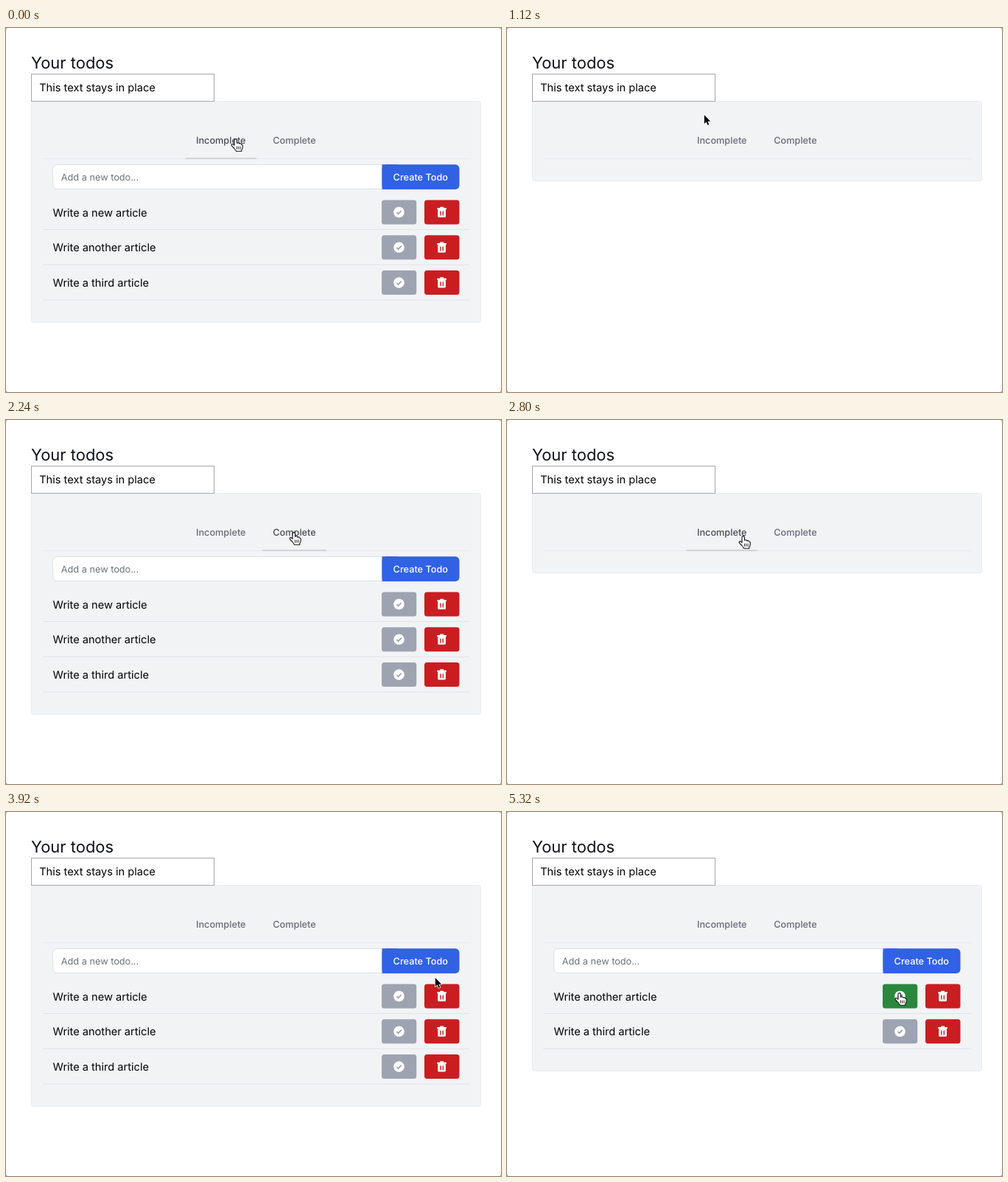
An HTML page for the animation above (5460 ms loop, 672 by 494 pixels).

```html
<!DOCTYPE html>
<html lang="en">
<head>
<meta charset="utf-8">
<title>Your todos</title>
<style>
  html, body { margin: 0; width: 100%; height: 100%; overflow: hidden; background: #fff; }
  svg { display: block; width: 100%; height: 100%; }
  text { font-family: Inter, "Liberation Sans", sans-serif; font-size: 14.6px; font-optical-sizing: none; fill: #000; text-rendering: geometricPrecision; }
  .title { font-size: 21.95px; fill: #10121a; }
  .small { font-size: 12.72px; }
  .mid { font-weight: 550; text-anchor: middle; }
</style>
</head>
<body>
<svg id="stage" viewBox="0 0 672 494" xmlns="http://www.w3.org/2000/svg"></svg>
<script>
const LOOP = 5460, STEP = 70, ROW = 47.8;
const GREY = "#9ea3b1", GREEN = "#2b873d", RED = "#c81e22";
const TODOS = ["Write a new article", "Write another article", "Write a third article"];

// Places the pointer visits
const spot = (x, y) => ({ x, y });
const START = spot(311, 150), INCOMPLETE = spot(300, 159), COMPLETE = spot(390, 152);
const EDGE = spot(320, 157), REST = spot(316, 157), ABOVE = spot(267, 117), NOTE = spot(75, 54);
const GAP = spot(582, 224), LIST = spot(348, 235), BESIDE = spot(506, 235), CHECK = spot(532, 245);

// Each move: start, end, destination
const MOVES = [
  [0, 490, COMPLETE], [630, 1120, ABOVE], [1190, 1330, NOTE], [1330, 1610, INCOMPLETE],
  [1750, 1960, GAP], [1960, 2240, COMPLETE], [2520, 2660, NOTE], [2660, 2800, EDGE],
  [2940, 3220, REST], [3710, 3920, GAP], [3920, 4060, LIST], [4270, 4410, GAP],
  [4410, 4550, BESIDE], [4690, 5250, CHECK]
];

const stage = document.getElementById("stage");

function add(parent, tag, attrs, content) {
  const el = document.createElementNS("http://www.w3.org/2000/svg", tag);
  for (const key in attrs) el.setAttribute(key, attrs[key]);
  if (content) el.textContent = content;
  parent.appendChild(el);
  return el;
}

function box(parent, x, y, width, height, rx, fill, stroke = "none") {
  return add(parent, "rect", { x, y, width, height, rx, fill, stroke });
}

function label(parent, x, y, content, cls = "", fill = "") {
  return add(parent, "text", { x, y, class: cls, style: fill && "fill:" + fill }, content);
}

function line(parent, x1, x2, y, stroke, width = 1) {
  return add(parent, "line", { x1, x2, y1: y, y2: y, stroke, "stroke-width": width });
}

function show(el, on) {
  el.style.display = on ? "" : "none";
}

// Page and panel
box(stage, 0, 0, 672, 494, 0, "#777");
box(stage, 0, 0, 672, 494, 2.5, "#fff");
const panel = box(stage, 34.5, 99.5, 610, 300, 3, "#f2f3f5", "#e9eaed");
box(stage, 34.5, 62.5, 248, 37, 0, "#fff", "#a5a6aa");
label(stage, 34, 55.4, "Your todos", "title");
label(stage, 45.2, 86, "This text stays in place");

// Tabs
line(stage, 49, 630.5, 177.5, "#e9eaed");
function makeTab(name, x, w) {
  return {
    x, w,
    text: label(stage, x + w / 2, 157.1, name, "small mid"),
    mark: line(stage, x, x + w, 177, "#c9cad0", 1.5)
  };
}
const tabs = [makeTab("Incomplete", 243.5, 96.5), makeTab("Complete", 348, 87)];

// Form
const list = add(stage, "g", {});
box(list, 63.5, 185.5, 470, 33, 5.5, "#fff", "#dfe1e6");
box(list, 510.5, 185.3, 105, 33.6, 5.5, "#3161e4");
box(list, 510.5, 185.3, 20, 33.6, 0, "#3161e4");
label(list, 74.8, 207, "Add a new todo...", "small", "#6d717b");
label(list, 562.8, 207, "Create Todo", "small mid", "#fff");

// Todo rows
const rows = TODOS.map((todo, i) => {
  const g = add(list, "g", { transform: `translate(0 ${i * ROW})` });
  const name = label(g, 63.5, 255.6, todo);
  const done = box(g, 510, 233.5, 47.2, 33, 3.5, GREY);
  add(g, "circle", { cx: 533.5, cy: 250, r: 7.3, fill: "#fff" });
  const tick = add(g, "path", { d: "M530.4 250.2l2.2 2.2 4.1-4.4", fill: "none", "stroke-width": 1.7 });
  box(g, 568, 233.5, 47.5, 33, 3.5, RED);
  box(g, 589, 242.7, 5.2, 3, 1, "#fff");
  box(g, 585.2, 244.2, 12.8, 2, 0.5, "#fff");
  box(g, 586.2, 245.5, 10.8, 11.5, 1.6, "#fff");
  for (const x of [589.2, 592.6]) box(g, x, 248.6, 1.4, 6, 0.5, RED);
  line(g, 49, 630.5, 273.5, "#e1e3e7");
  return { g, name, done, tick };
});

// Pointers
const arrow = add(stage, "path", {
  d: "M.8 1V13L3.6 10.6L5.4 14.8L7.3 14L5.5 9.8H9.2Z",
  stroke: "#fff", "stroke-width": 1.6, "stroke-linejoin": "round", "paint-order": "stroke"
});
const hand = add(stage, "g", { stroke: "#111", "stroke-linejoin": "round" });
add(hand, "path", {
  d: "M-1 2.4Q-1 .6 .7 .6T2.5 2.4V6.3Q5 5 5.7 7Q8 6 8.3 8Q10.3 7.6 10.2 10V12Q10 14 8.8 15.5V17.3H1.5Q.6 15.4-1 13.5L-4.6 9.8Q-5.4 8-4 7.6T-1 9.4Z",
  fill: "#fff", "stroke-width": 1.1
});
for (const x of [2.5, 4.8, 7.1]) add(hand, "path", { d: `M${x} 10.6v4`, "stroke-width": 0.9 });

const ease = k => k * k * (3 - 2 * k);

function pointerAt(t) {
  let { x, y } = START;
  for (const [from, to, goal] of MOVES) {
    const k = ease(Math.min(1, Math.max(0, (t - from) / (to - from))));
    x += (goal.x - x) * k;
    y += (goal.y - y) * k;
  }
  return { x, y };
}

function inside(p, x, y, w, h) {
  return p.x >= x && p.x <= x + w && p.y >= y && p.y <= y + h;
}

function draw(time) {
  const t = Math.floor((time % LOOP) / STEP) * STEP;
  const p = pointerAt(t);
  const empty = (t >= 490 && t < 1680) || (t >= 2380 && t < 3220);
  const count = t >= 5250 ? 2 : 3;
  let over = false;

  for (const tab of tabs) {
    const hot = inside(p, tab.x, 128, tab.w, 50);
    tab.text.style.fill = hot ? "#4b4c57" : "#696b75";
    show(tab.mark, hot);
    over = over || hot;
  }

  panel.setAttribute("height", empty ? 108 : 156 + count * 48);
  show(list, !empty);
  rows.forEach((row, i) => {
    const hot = !empty && i < count && inside(p, 510, 233.5 + i * ROW, 47, 33);
    const color = hot ? GREEN : GREY;
    show(row.g, i < count);
    row.name.textContent = TODOS[i + TODOS.length - count];
    row.done.setAttribute("fill", color);
    row.tick.setAttribute("stroke", color);
    over = over || hot;
  });

  for (const el of [hand, arrow]) el.setAttribute("transform", `translate(${p.x} ${p.y})`);
  show(hand, over);
  show(arrow, !over);
}

const start = performance.now();
function tick() {
  draw(performance.now() - start);
  requestAnimationFrame(tick);
}
tick();
</script>
</body>
</html>
```
